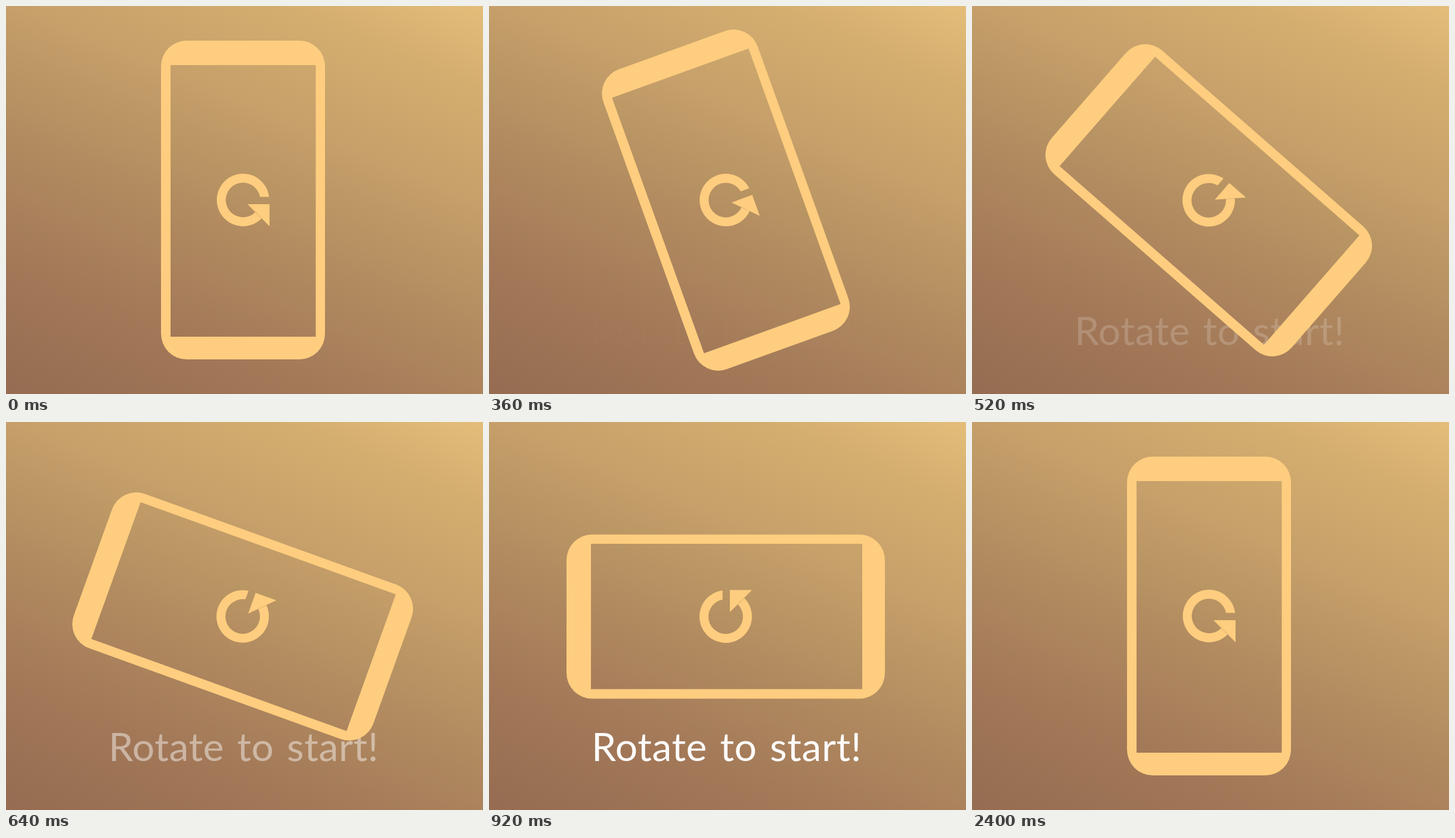
These frames come from a looping animation (800 px wide and 650 px high, 2.44 s). An HTML page:

```html
<!DOCTYPE html>
<html lang="en">
<head>
<meta charset="utf-8">
<title>Rotate to start</title>
<style>
  html, body { margin: 0; width: 100%; height: 100%; overflow: hidden; }
  body {
    background: linear-gradient(23deg, #966c52, #a27858 22%, #b0895f 42%, #ba9664 55%,
      #c69f6a 66%, #d4ae6f 86%, #e4bd7a);
  }
  svg { display: block; width: 800px; height: 650px; }
  text { font: 66px Lato, sans-serif; letter-spacing: .6px; word-spacing: 4px; fill: #fff; }
  #phone { fill: #fecd7f; }
</style>
</head>
<body>
<svg viewBox="0 0 800 650">
  <g id="scene">
    <text id="label" x="172" y="568">Rotate to start!</text>
    <g id="phone">
      <path fill-rule="evenodd" d="M-94.5-267H94.5a43 43 0 0 1 43 43V224a43 43 0 0 1-43 43H-94.5a43 43 0 0 1-43-43V-224a43 43 0 0 1 43-43Z
        M-121.5-226V229H122V-226Z"/>
      <path d="M43.7-5.3A44 44 0 1 0 31.1 31.1L20.5 20.5A29 29 0 1 1 28.5-5.3Z"/>
      <path d="M7.5 7H44.5V44Z"/>
    </g>
  </g>
</svg>
<script>
  const LOOP = 2440, STEP = 40;
  const [scene, label, phone] = ['scene', 'label', 'phone'].map(id => document.getElementById(id));

  const progress = (t, from, to) => Math.min(1, Math.max(0, (t - from) / (to - from)));

  // cubic-bezier(.42, 0, .58, 1), solved by bisection
  function easeInOut(x) {
    let lo = 0, hi = 1, s = .5;
    for (let i = 0; i < 24; i++) {
      s = (lo + hi) / 2;
      const bx = 3 * s * (1 - s) ** 2 * .42 + 3 * s * s * (1 - s) * .58 + s ** 3;
      if (bx < x) lo = s; else hi = s;
    }
    return s * s * (3 - 2 * s);
  }

  function draw(t) {
    const reset = t >= 2300;
    const angle = reset ? 0 : -90 * easeInOut(progress(t, 100, 900));
    phone.setAttribute('transform', `translate(397.75 325.75) rotate(${angle}) translate(-.25 -.75)`);
    label.setAttribute('opacity', reset ? 0 : easeInOut(progress(Math.min(t, 920), 320, 1000)));
    scene.setAttribute('opacity', reset ? progress(t, 2333, 2400) : 1 - progress(t, 2200, 2267));
  }

  const start = performance.now();
  function tick() {
    const t = (performance.now() - start) % LOOP;
    draw(Math.floor(t / STEP) * STEP);
    requestAnimationFrame(tick);
  }
  tick();
</script>
</body>
</html>
```
